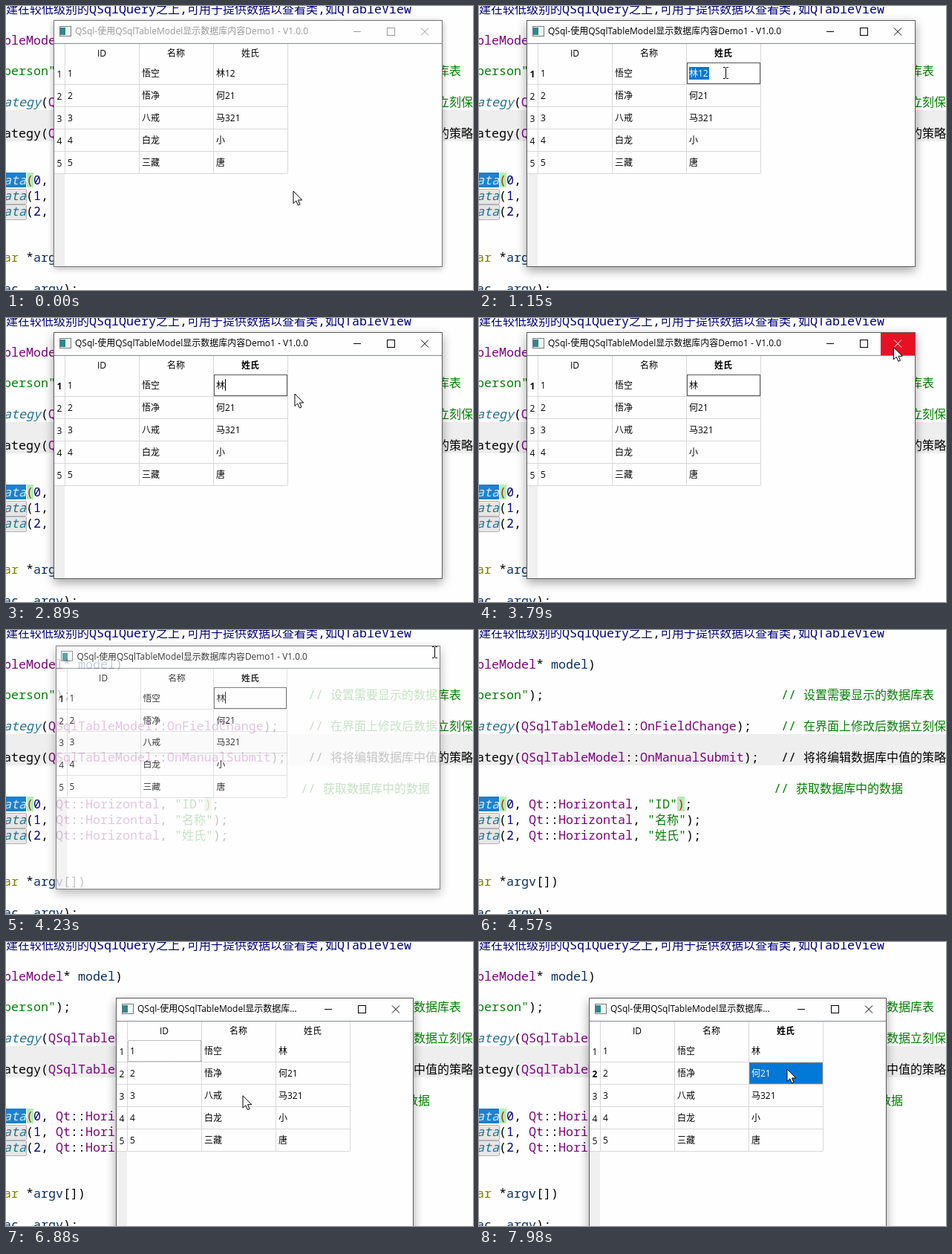
Recreate the animation shown at these times as an HTML page. Size 629 px wide and 382 px high, loop 8000 ms.

```html
<!DOCTYPE html>
<html lang="zh">
<head>
<meta charset="utf-8">
<title>Table model demo</title>
<style>
html, body { margin: 0; width: 100%; height: 100%; overflow: hidden; background: #fefefe; }
svg { display: block; }
text { white-space: pre; font: 12px 'Open Sans', 'Noto Sans CJK SC', 'Noto Sans CJK', sans-serif; }
.code { font: 300 16.667px 'Noto Sans Mono', 'Noto Sans CJK SC', 'Noto Sans CJK', monospace; }
.doc, .num { fill: #000080; }
.type { fill: #800080; }
.str, .note { fill: #008000; }
.key { fill: #808000; }
.local { fill: #092e64; }
.call { fill: #1f7390; font-style: italic; }
.sel { fill: #d5e8f6; font-style: italic; }
.paren { fill: #c22020; }
.mid { text-anchor: middle; }
.bold { font-weight: bold; }
rect, .line { shape-rendering: crispEdges; }
</style>
</head>
<body>
<svg id="stage" width="629" height="382" viewBox="0 0 629 382"></svg>
<script>
const LOOP = 8000, STEP = 110.3, PHASE = 16;
const stage = document.getElementById('stage');

const rect = (x, y, w, h, fill, extra = '') =>
  `<rect x="${x}" y="${y}" width="${w}" height="${h}" fill="${fill}" ${extra}/>`;
const frame = (x, y, w, h, stroke, extra = '') =>
  rect(x + .5, y + .5, w - 1, h - 1, 'none', `stroke="${stroke}" ${extra}`);
const label = (x, y, text, fill = '#000', cls = '') =>
  `<text x="${x}" y="${y}" fill="${fill}" class="${cls}">${text}</text>`;
const stroke = (d, color, extra = '') =>
  `<path d="${d}" fill="none" stroke="${color}" ${extra}/>`;

// Linear interpolation through [time, ...values] keys
function along(keys, t) {
  const i = keys.findIndex(k => k[0] > t);
  if (i === 0) return keys[0].slice(1);
  if (i < 0) return keys[keys.length - 1].slice(1);
  const a = keys[i - 1], b = keys[i], p = (t - a[0]) / (b[0] - a[0]);
  return a.slice(1).map((v, j) => v + (b[j + 1] - v) * p);
}

// ---- code editor behind the window ----
const CODE_X = -3;

function codeLine(row, x, ...runs) {
  const spans = runs.map(([cls, text]) => {
    const sized = text.replace(/[\u4e00-\u9fff]+/g, s => `<tspan font-size="16">${s}</tspan>`);
    return `<tspan class="${cls}">${sized}</tspan>`;
  });
  return `<text class="code" x="${x}" y="${Math.round(9.8 + 20.9 * row)}">${spans.join('')}</text>`;
}
const dataLine = (row, index, name, cls, paren) => codeLine(row, CODE_X,
  [cls, 'ata'], [paren, '('], ['num', index], ['', ', '], ['type', 'Qt'], ['', '::'],
  ['type', 'Horizontal'], ['', ', '], ['str', `"${name}"`], [paren, ')'], ['', ';']);
const strategyLine = (row, cls, value) => codeLine(row, CODE_X,
  [cls, 'ategy'], ['', '('], ['type', 'QSqlTableModel'], ['', '::'], ['type', value], ['', ');']);

const editor = [
  rect(0, 0, 629, 382, '#fefefe'),
  rect(0, 140, 629, 42, '#eeeeee'),
  rect(-4, 224, 31, 20, '#1f80cc'),
  rect(28, 224, 9, 20, '#b4eeb4'),
  rect(267, 224, 10, 20, '#b4eeb4'),
  ...[246, 267].map(y =>
    `<rect x="-5.5" y="${y + .5}" width="33" height="20" rx="2" fill="#e6e6e6" stroke="#b4b4b4"/>`),
  codeLine(0, 0, ['doc', '建在较低级别的QSqlQuery之上,可用于提供数据以查看类,如QTableView']),
  codeLine(2, CODE_X, ['type', 'bleModel'], ['', '* '], ['local', 'model'], ['', ')']),
  codeLine(4, CODE_X, ['str', 'person"'], ['', ');']),
  codeLine(4, 407, ['note', '// 设置需要显示的数据库表']),
  strategyLine(6, 'call', 'OnFieldChange'),
  codeLine(6, 407, ['note', '// 在界面上修改后数据立刻保']),
  strategyLine(8, '', 'OnManualSubmit'),
  codeLine(8, 407, ['', '// 将将编辑数据库中值的策略']),
  codeLine(10, 397, ['note', '// 获取数据库中的数据']),
  dataLine(11, '0', 'ID', 'sel', 'paren'),
  dataLine(12, '1', '名称', 'call', ''),
  dataLine(13, '2', '姓氏', 'call', ''),
  codeLine(16, CODE_X, ['key', 'ar'], ['', ' *'], ['local', 'argv'], ['', '[])']),
  codeLine(18, CODE_X, ['local', 'ac'], ['', ', '], ['local', 'argv'], ['', ');'])
].join('');

// ---- table window, drawn from its own top left corner ----
const HEIGHT = 332, COL = 100, ROW = 30, LEFT = 15, TOP = 56;
const GIVEN = ['悟空', '悟净', '八戒', '白龙', '三藏'];
const cellX = col => LEFT + COL * col;
const cellY = row => TOP + ROW * row;

function captionButtons(w, color, hot) {
  const x = w - 24;
  return (hot ? rect(w - 47, 1, 46, 30, '#e81123') : '') +
    stroke(`M${x - 96} 15.5h10`, color, 'class="line"') +
    frame(x - 51, 10, 11, 11, color) +
    stroke(`M${x - 5} 10.5l10 10m0 -10l-10 10`, hot ? '#fff' : color);
}

function table(s) {
  const parts = [rect(1, 207, 14, HEIGHT - 208, '#f0f0f0')];
  for (let col = 0; col <= 3; col++)
    parts.push(stroke(`M${cellX(col) + .5} 32V206`, '#d8d8d8', 'class="line"'));
  ['ID', '名称', '姓氏'].forEach((name, col) =>
    parts.push(label(cellX(col) + 50, 49, name, '#000', s.current && s.current[1] === col ? 'mid bold' : 'mid')));

  GIVEN.forEach((given, row) => {
    const y = cellY(row), base = y + 20;
    parts.push(stroke(`M1 ${y + 30.5}H${cellX(3)}`, '#d8d8d8', 'class="line"'));
    parts.push(label(8, base + 1, row + 1, '#000', s.current && s.current[0] === row ? 'mid bold' : 'mid'));
    [row + 1, given, [s.first, '何21', '马321', '小', '唐'][row]].forEach((text, col) => {
      const x = cellX(col);
      const here = s.current && s.current[0] === row && s.current[1] === col;
      let color = '#000';
      if (here && s.editing) {
        parts.push(rect(x + 1, y + 1, 99, 29, '#fff'), frame(x + 1, y + 1, 99, 29, '#555'));
        if (s.allSelected) {
          parts.push(rect(x + 4, y + 7, 27, 17, '#0078d7'));
          color = '#fff';
        } else if (s.caret) {
          parts.push(rect(x + 16 + 7 * (s.first.length - 1), y + 7, 1, 16, '#000'));
        }
      } else if (here) {
        parts.push(rect(x + 1, y + 1, 99, 29, '#0078d7'),
          frame(x + 1, y + 1, 99, 29, '#e58a38', 'stroke-dasharray="1 1"'));
        color = '#fff';
      }
      parts.push(label(x + 4, base, text, color));
    });
  });
  if (s.focusFirst) parts.push(frame(LEFT + 1, TOP + 1, 99, 29, '#777', 'stroke-dasharray="1 1"'));
  return parts.join('');
}

function tableWindow(s) {
  const { x, y, w } = s, cx = w / 2, cy = HEIGHT / 2;
  const ink = s.active ? '#000' : '#999';
  const shadow = s.active ? [5, 7, .36] : [2, 4, .3];
  return `<g opacity="${s.alpha}" transform="translate(${x + cx} ${y + cy}) scale(${s.scale}) translate(${-cx} ${-cy})">` +
    rect(0, shadow[0], w, HEIGHT, '#000', `opacity="${shadow[2]}" style="filter:blur(${shadow[1]}px)"`) +
    rect(0, 0, w, HEIGHT, '#fefefe') +
    rect(8, 8, 15, 13, '#f4f6f6', 'stroke="#777"') + rect(9, 10, 7, 10, '#2f8791') +
    label(29, 19, s.title, ink) +
    (s.closing ? '' : captionButtons(w, ink, s.hot)) +
    stroke(`M0 31.5H${w}`, '#828790', 'class="line"') +
    table(s) +
    frame(0, 0, w, HEIGHT, s.active ? '#5c5c5c' : '#777') + '</g>';
}

// ---- timeline ----
const MOUSE = [
  [16, 387, 249], [347, 332, 80], [900, 332, 80], [920, 332, 90], [1450, 332, 90],
  [1800, 309, 84], [2300, 309, 84], [2550, 330, 92], [2884, 389, 102], [3000, 421, 110],
  [3110, 433, 102], [3200, 433, 102], [3850, 577, 30], [5700, 577, 30], [5720, 140, 314],
  [5860, 185, 283], [6050, 185, 283], [6300, 252, 230], [6524, 260, 229], [7280, 395, 178],
  [7420, 395, 178], [7640, 404, 160], [7930, 404, 160], [7950, 415, 171]
];
const CLOSING = [[4080, 1, 1], [4227, .74, .988], [4450, .05, .95], [4540, 0, .94]];
const OPENING = [[6500, .12, .957], [6524, .15, .96], [6750, 1, 1]];
const TITLE = 'QSql-使用QSqlTableModel显示数据库';

function firstWindow(t, mx, my) {
  const [alpha, scale] = along(CLOSING, t), closing = t > 4100;
  return tableWindow({
    x: 64, y: 19, w: 524, alpha, scale, closing,
    title: TITLE + '内容Demo1 - V1.0.0',
    active: t > 560,
    current: t > 560 && [0, 2],
    editing: t > 910,
    allSelected: t < 1700,
    caret: Math.floor((t - 1750) / 530) % 2 === 0,
    first: t < 2000 ? '林12' : t < 2110 ? '林1' : '林',
    hot: mx > 541 && my < 50
  });
}

function secondWindow(t) {
  const [alpha, scale] = along(OPENING, t), clicked = t > 7500;
  return tableWindow({
    x: 148, y: 75, w: 401, alpha, scale,
    title: TITLE + '...', active: true, first: '林',
    current: clicked && [1, 2], focusFirst: !clicked
  });
}

function pointer(t, x, y) {
  if (t > 4500 && t < 5700) return '';
  const beam = (t > 910 && t < 2860 && x < 379) || (t > 4100 && t < 6500);
  const shape = beam
    ? stroke('M-3 -7.5h2.5l1 1 1 -1h2.5M.5 -7V7M-3 7.5h2.5l1 -1 1 1h2.5', '#000')
    : '<path d="M0 0V16.5L3.8 13 6.4 19 9 17.9 6.5 12H11.8Z" fill="#fff" stroke="#000"/>';
  return `<g transform="translate(${x} ${y})">${shape}</g>`;
}

function scene(t) {
  const [mx, my] = along(MOUSE, t);
  const codeCaret = t > 5180 && t < 6850 && Math.floor((t - 5180) / 550) % 2 === 0;
  return editor +
    (codeCaret ? rect(27, 224, 2, 20, '#000') : '') +
    (t < 4540 ? firstWindow(t, mx, my) : '') +
    (t > 6500 ? secondWindow(t) : '') +
    pointer(t, mx, my);
}

let shown = null;
function tick() {
  const t = performance.now() % LOOP;
  const step = Math.floor((t - PHASE) / STEP);
  if (step !== shown) {
    shown = step;
    stage.innerHTML = scene(PHASE + step * STEP);
  }
  requestAnimationFrame(tick);
}
tick();
</script>
</body>
</html>
```
